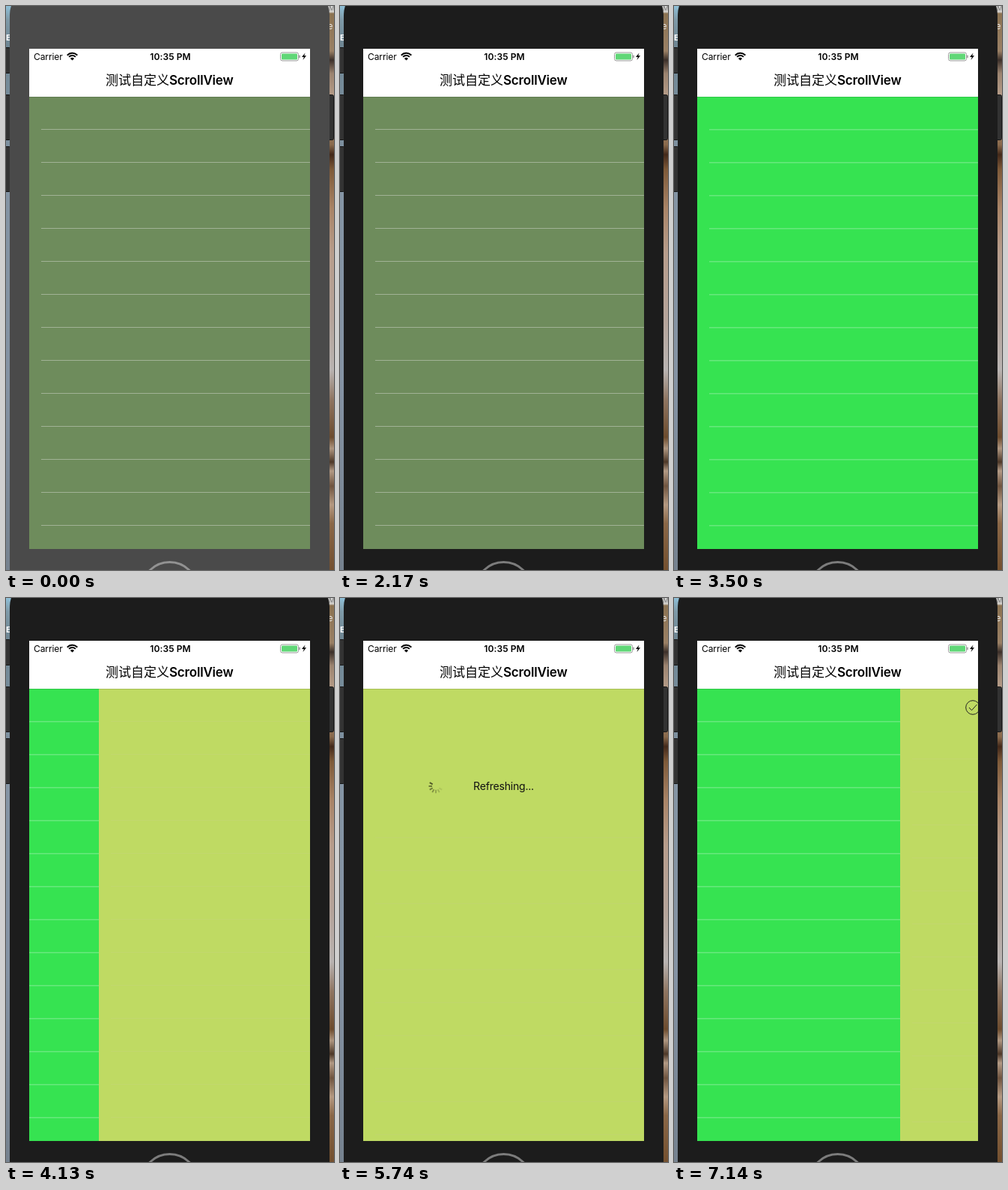
These frames come from a looping animation (438 px wide and 752 px high, 7.21 s). An HTML page with a canvas:

```html
<!DOCTYPE html>
<html lang="zh">
<head>
<meta charset="utf-8">
<style>
html, body { margin: 0; width: 100%; height: 100%; overflow: hidden; background: #1c1c1c; }
canvas { display: block; width: 438px; height: 752px; }
</style>
</head>
<body>
<canvas id="stage" width="438" height="752"></canvas>
<script>
const ctx = document.getElementById('stage').getContext('2d');
const LOOP = 7210;
const VIEW = { x: 31, y: 121, w: 375, h: 603 };
const ROW = 44;
const SANS = 'Inter, Roboto, "Noto Sans CJK SC", "Noto Sans CJK", sans-serif';
const PAGES = [
  { fill: '#6e8c5c', line: '#a1b296', thick: 1 },
  { fill: '#36e351', line: '#65e87b', thick: 1.6 },
  { fill: '#bfda63', line: 'rgba(205,205,150,.22)', thick: 1 }
];

const progress = (t, from, to) => Math.min(1, Math.max(0, (t - from) / (to - from)));
const smooth = p => p * p * (3 - 2 * p);
// quick drag followed by a longer deceleration
const swipe = (t, from, to) => smooth(1 - Math.pow(1 - progress(t, from, to), 1.5));

function rect(x, y, w, h, fill) {
  ctx.fillStyle = fill;
  ctx.fillRect(x, y, w, h);
}

function round(x, y, w, h, r, fill, stroke) {
  ctx.beginPath();
  ctx.roundRect(x, y, w, h, r);
  if (fill) { ctx.fillStyle = fill; ctx.fill(); }
  if (stroke) { ctx.strokeStyle = stroke; ctx.lineWidth = 1; ctx.stroke(); }
}

function text(str, x, y, font, align = 'left', fill = '#000', spacing = 0) {
  ctx.font = font + ' ' + SANS;
  ctx.textAlign = align;
  ctx.letterSpacing = spacing + 'px';
  ctx.fillStyle = fill;
  ctx.fillText(str, x, y);
}

function path(points, width, color) {
  ctx.beginPath();
  points.forEach(([x, y]) => ctx.lineTo(x, y));
  ctx.lineWidth = width;
  ctx.strokeStyle = color;
  ctx.stroke();
}

function strip(x, w, stops) {
  const g = ctx.createLinearGradient(0, 0, 0, 752);
  stops.forEach(([y, color]) => g.addColorStop(y / 752, color));
  rect(x, 0, w, 752, g);
}

function drawDesktop() {
  strip(0, 9, [[0, '#8fc0d8'], [18, '#7f9aa8'], [50, '#6f8794'], [250, '#8494a4'],
    [500, '#8593a4'], [752, '#76828f']]);
  strip(429, 9, [[0, '#d8d8d8'], [8, '#d0cdc8'], [10, '#8c7352'], [60, '#9a8065'], [72, '#3c302a'],
    [90, '#9c8470'], [120, '#b59c88'], [185, '#8a6a4c'], [198, '#43291a'], [218, '#7e5a39'],
    [270, '#a98467'], [330, '#b79d8c'], [420, '#b5a49b'], [485, '#b9b4b2'], [525, '#8f7561'],
    [575, '#6d4c2e'], [590, '#ae9680'], [608, '#4d3828'], [620, '#b29a85'], [640, '#705540'],
    [665, '#b59a82'], [690, '#8a6747'], [752, '#74502f']]);
  text('E', 0, 46, '700 11px', 'left', '#fff');
  text('M', 431, 6, '400 9px', 'left', '#777');
  text('e', 430, 31, '400 11px', 'left', '#eee');
}

function drawPhone(body, ring) {
  [[-4, 55, 35], [-4, 118, 61], [-4, 187, 61], [427, 118, 61]].forEach(([x, y, h]) =>
    round(x + .5, y + .5, 10, h - 1, 2, '#333', '#141414'));
  round(5, -28, 427, 900, 40, body);
  ctx.beginPath();
  ctx.arc(218.5, 779, 37.5, 0, 7);
  ctx.lineWidth = 3;
  ctx.strokeStyle = ring;
  ctx.stroke();
}

function drawStatus() {
  rect(31, 57, 375, 64, '#fff');
  text('Carrier', 37, 71.5, '400 12px', 'left', '#000', -.1);
  text('10:35 PM', 219.5, 71.5, '600 12px', 'center', '#000', .1);
  text('测试自定义', 133, 105, '500 17px "Noto Sans CJK SC",');
  text('ScrollView', 218, 105, '600 17px', 'left', '#000', -.2);

  // wifi
  ctx.strokeStyle = '#000';
  ctx.lineWidth = 2;
  [9.2, 6].forEach(r => {
    ctx.beginPath();
    ctx.arc(88.5, 72, r, -Math.PI * .76, -Math.PI * .24);
    ctx.stroke();
  });
  ctx.beginPath();
  ctx.moveTo(88.5, 72.5);
  ctx.arc(88.5, 72.5, 3.6, -Math.PI * .76, -Math.PI * .24);
  ctx.fillStyle = '#000';
  ctx.fill();

  // battery
  round(366.5, 62, 24, 11, 2.5, '#fff', '#9a9a9a');
  round(368, 63.5, 21, 8, 1.2, '#60d777');
  round(391.3, 65.5, 1.5, 4, 1, '#9a9a9a');
  ctx.beginPath();
  [[399.5, 62.5], [395, 68], [397.8, 68], [396.5, 72], [401, 66.3], [398.2, 66.3]]
    .forEach(([x, y]) => ctx.lineTo(x, y));
  ctx.fillStyle = '#000';
  ctx.fill();
}

function drawSpinner(x, y, t) {
  const head = Math.floor(t * 12 / 1000) + 2;
  for (let lag = 0; lag < 7; lag++) {
    const a = (head - lag) * Math.PI / 6;
    const sx = Math.sin(a), sy = -Math.cos(a);
    path([[x + 5 * sx, y + 5 * sy], [x + 9.5 * sx, y + 9.5 * sy]], 1.8,
      `rgba(60,65,30,${.85 - lag * .12})`);
  }
}

function drawHeader(x, y, t) {
  if (t < 6790) {
    drawSpinner(x + 97, y, t);
    text('Refreshing...', x + 187.5, y + 5, '400 14px', 'center', '#111', -.2);
    return;
  }
  ctx.beginPath();
  ctx.arc(x + 97, y, 9.3, 0, 7);
  ctx.lineWidth = 1;
  ctx.strokeStyle = '#222';
  ctx.stroke();
  path([[x + 92, y], [x + 95.5, y + 3.8], [x + 102.5, y - 4]], 1, '#222');
}

function drawPages(t) {
  const scroll = swipe(t, 2442, 3010) + swipe(t, 3665, 4550) - swipe(t, 6837, 7437);
  const pull = 160 * smooth(progress(t, 5250, 5800)) - 110 * smooth(progress(t, 5830, 6230));
  ctx.save();
  ctx.beginPath();
  ctx.rect(VIEW.x, VIEW.y, VIEW.w, VIEW.h);
  ctx.clip();
  PAGES.forEach((page, i) => {
    const x = Math.round(VIEW.x + (i - scroll) * VIEW.w);
    const top = VIEW.y + (i === 2 ? pull : 0);
    rect(x, VIEW.y, VIEW.w, VIEW.h, page.fill);
    for (let y = top + ROW - 1; y < VIEW.y + VIEW.h; y += ROW)
      rect(x + 16, y, VIEW.w - 16, page.thick, page.line);
    if (i === 2 && pull > 0) drawHeader(x, top - 25, t);
  });
  ctx.restore();
  rect(VIEW.x, VIEW.y, VIEW.w, .5, 'rgba(0,0,0,.25)');
}

function frame(now) {
  const t = now % LOOP;
  const dim = t < 70;
  ctx.clearRect(0, 0, 438, 752);
  drawDesktop();
  drawPhone(dim ? '#4a4a4a' : '#1c1c1c', dim ? '#929292' : '#7c7c7c');
  drawStatus();
  drawPages(t);
  requestAnimationFrame(frame);
}

const start = performance.now();
frame(0);
requestAnimationFrame(function tick() {
  frame = () => {
    const t = (performance.now() - start) % LOOP;
    const dim = t < 70;
    ctx.clearRect(0, 0, 438, 752);
    drawDesktop();
    drawPhone(dim ? '#4a4a4a' : '#1c1c1c', dim ? '#929292' : '#7c7c7c');
    drawStatus();
    drawPages(t);
    requestAnimationFrame(frame);
  };
  frame();
});
</script>
</body>
</html>
```
